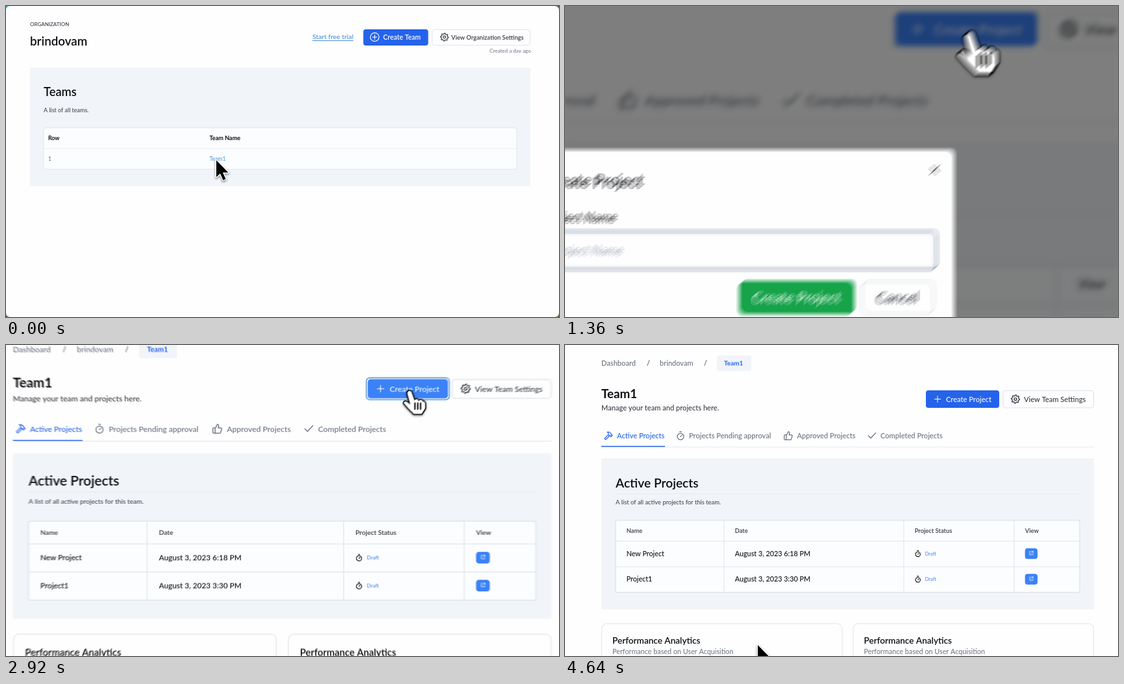
Recreate the animation shown at these times as an HTML page with a canvas. Size 852 by 480 pixels, loop 4.66 s.

```html
<!DOCTYPE html>
<html lang="en">
<head>
<meta charset="utf-8">
<title>Team dashboard walkthrough</title>
<style>
html, body { margin: 0; width: 100%; height: 100%; overflow: hidden; background: #fefefe; }
canvas { display: block; }
</style>
</head>
<body>
<canvas id="stage" width="852" height="480"></canvas>
<script>
const W = 852, H = 480, LOOP = 4660;
const OPEN_TEAM = 260, OPEN_MODAL = 850, SAVE = 2350;
const ORG = 'brindovam';

const newLayer = () => Object.assign(document.createElement('canvas'), { width: W, height: H }).getContext('2d');
const stage = document.getElementById('stage').getContext('2d');
const scene = newLayer(), backdrop = newLayer();
let g = scene;

const palette = {
  bg: '#fefefe', panel: '#f1f5f9', table: '#fcfdfe', hover: '#f5f7fa', line: '#e0e5ec', faint: '#e8ecf2',
  ink: '#0d0f13', text: '#363b44', mute: '#6a7280', hint: '#a3abb8',
  blue: '#2563eb', sky: '#3b82f6', link: '#4a8fd8', ring: '#94a3b8', onBlue: '#ffffff', green: '#16a34a'
};

const gear = (() => {
  const points = [];
  for (let i = 0; i < 32; i++) {
    const r = i % 4 < 2 ? 10 : 7.6, a = i / 16 * Math.PI;
    points.push(`${(12 + r * Math.cos(a)).toFixed(2)} ${(12 + r * Math.sin(a)).toFixed(2)}`);
  }
  return `M${points.join('L')}ZM15 12a3 3 0 1 1-6 0a3 3 0 1 1 6 0`;
})();

const icons = {
  gear,
  plus: 'M12 4v16M4 12h16',
  plusCircle: 'M22 12a10 10 0 1 1-20 0a10 10 0 1 1 20 0M12 7v10M7 12h10',
  timer: 'M10 2h4M12 14l3-3M20 14a8 8 0 1 1-16 0a8 8 0 1 1 16 0',
  thumb: 'M7 10v12M15 5.9 14 10h5.8a2 2 0 0 1 1.9 2.6l-2.3 8A2 2 0 0 1 17.5 22H4a2 2 0 0 1-2-2v-8a2 2 0 0 1 2-2h2.8a2 2 0 0 0 1.8-1.1L12 2a3.1 3.1 0 0 1 3 3.9Z',
  check: 'M21 5 9 18l-6-6',
  hammer: 'm15 12-8.5 8.5c-.8.8-2.2.8-3 0a2.1 2.1 0 0 1 0-3L12 9M17.6 15 22 10.6M20.9 11.7l-1.2-1.2c-.6-.6-1-1.4-1-2.3v-.9L16 4.6A5.6 5.6 0 0 0 12 3H9l1 .8A6.2 6.2 0 0 1 12 8.4V10l2 2h2.5l2.2 1.9',
  open: 'M9 5H5v14h14v-4M13 4h7v7M20 4l-9 9',
  close: 'M19 5 5 19M5 5l14 14'
};
for (const name in icons) icons[name] = new Path2D(icons[name]);

const arrow = new Path2D('M0 0V26L6 20.5L10.5 31L14.5 29L10 19H18.5Z');
const hand = new Path2D('M-2 4C-3-1 3-2 4 2L8 13C10 10 13 11 14 14C16 11 19 12 20 15C22 14 23 16 23 19V24L18 32H7L-1 24L-7 17C-7 13-3 14 2 19Z');
const fingers = new Path2D('M8.5 16v10M12.5 16v10M16.5 16v10');

// y is the middle of the capitals
function text(str, x, y, size, color = 'ink', weight = 400) {
  g.font = `${weight} ${size}px Lato, sans-serif`;
  g.fillStyle = palette[color];
  g.fillText(str, x, y + size * .35);
  return x + g.measureText(str).width;
}

function box(x0, y0, x1, y1, r, fill, stroke, width = 1) {
  g.beginPath();
  g.roundRect(x0, y0, x1 - x0, y1 - y0, r);
  if (fill) { g.fillStyle = palette[fill]; g.fill(); }
  if (stroke) { g.strokeStyle = palette[stroke]; g.lineWidth = width; g.stroke(); }
}

function line(x0, y0, x1, y1, color = 'line', width = 1) {
  g.beginPath();
  g.moveTo(x0, y0);
  g.lineTo(x1, y1);
  g.strokeStyle = palette[color];
  g.lineWidth = width;
  g.stroke();
}

function icon(name, cx, cy, size, color, weight = 2) {
  g.save();
  g.translate(cx - size / 2, cy - size / 2);
  g.scale(size / 24, size / 24);
  g.lineCap = g.lineJoin = 'round';
  g.lineWidth = weight;
  g.strokeStyle = palette[color];
  g.stroke(icons[name]);
  g.restore();
}

const clamp = v => Math.min(1, Math.max(0, v));
const ramp = (t, from, length) => clamp((t - from) / length);
const press = (t, at) => 1 - .16 * Math.sin(Math.PI * ramp(t, at, 200));

// Eased value between keys of the form [time, ...values]
function track(keys, t) {
  const i = keys.findIndex(k => k[0] > t);
  if (i < 1) return (i ? keys[keys.length - 1] : keys[0]).slice(1);
  const a = keys[i - 1], b = keys[i], u = (t - a[0]) / (b[0] - a[0]), e = u * u * (3 - 2 * u);
  return a.slice(1).map((v, j) => v + (b[j + 1] - v) * e);
}

const centerKeys = [[250, 426, 240], [850, 590, 126], [1035, 590, 126], [1715, 427, 260], [2430, 427, 260],
  [2960, 436, 241], [3230, 436, 241], [3840, 312, 284], [4120, 312, 284], [4640, 426, 240]];
const zoomKeys = [[250, 1], [850, 1.7], [1030, 1.7], [1300, 1.94], [1700, 1.925], [2430, 1.925],
  [2960, 1.08], [3230, 1.08], [3840, 1.516], [4120, 1.516], [4640, 1]];
const cursorKeys = [[200, 324, 238], [800, 614, 87], [3050, 614, 87], [3850, 412, 325], [4080, 412, 325], [4640, 297, 463]];
const camera = t => [...track(centerKeys, t), ...track(zoomKeys, t)];

function organizationPage() {
  const corners = g.createLinearGradient(0, 0, W, H);
  corners.addColorStop(0, '#5a9ca8');
  corners.addColorStop(.4, '#45454c');
  corners.addColorStop(1, '#6e5c3c');
  g.fillStyle = corners;
  g.fillRect(0, 0, W, H);
  box(0, 0, W, H, 6, 'bg');
  text('ORGANIZATION', 37, 28, 8, 'text', 500);
  text(ORG, 37, 54, 18.8, 'ink', 600);
  text('Start free trial', 472, 47.5, 10.4, 'link', 500);
  line(472, 53.5, 535, 53.5, 'link');
  box(550.5, 36, 650.5, 61, 4, 'blue');
  icon('plusCircle', 568, 48, 16, 'onBlue', 1.7);
  text('Create Team', 581, 48.5, 10.5, 'onBlue', 600);
  box(656.5, 36.5, 807.5, 60.5, 4, 'bg', 'line');
  icon('gear', 675.5, 48, 14.5, 'text');
  text('View Organization Settings', 686, 48.5, 9.3, 'text', 600);
  text('Created a day ago', 745, 69, 8.1, 'mute');
  box(37, 95, 808, 278, 0, 'panel');
  text('Teams', 58, 132.5, 18.3, 'ink', 600);
  text('A list of all teams.', 58, 160.5, 9, 'text');
  box(58, 188, 787, 252, 4, 'table', 'line');
  line(58, 220, 787, 220, 'faint');
  text('Row', 65, 203.5, 8.8, 'ink', 700);
  text('Team Name', 313.5, 203.5, 9.1, 'ink', 700);
  text('1', 65, 236, 8.6, 'mute');
  text('Team1', 313.5, 236, 8.6, 'link');
}

function teamHeader(hovered, focused) {
  text('Dashboard', 56, 28, 11.1, 'mute', 500);
  text('/', 126, 28, 11, 'text');
  text(ORG, 146, 28, 11, 'mute', 500);
  text('/', 214, 28, 11, 'text');
  box(234, 16, 287, 40, 3, 'panel');
  text('Team1', 245, 28, 10, 'blue', 700);
  text('Team1', 56, 75, 18.8, 'ink', 700);
  text('Manage your team and projects here.', 56, 97.5, 11.1, 'text', 500);

  if (focused) box(554, 68, 671, 99, 5, null, 'link', 1.3);
  box(556, 70, 669, 97, 4, hovered ? 'sky' : 'blue');
  icon('plus', 574, 83.5, 14, 'onBlue', 1.8);
  text('Create Project', 587, 84, 11.1, 'onBlue', 500);
  box(675, 70.5, 814.5, 97, 4, 'bg', 'line', 1.2);
  icon('gear', 694, 83.5, 15.5, 'text');
  text('View Team Settings', 707, 84, 11.1, 'text', 500);

  const tabs = [['hammer', 67, 'Active Projects', 80], ['timer', 178, 'Projects Pending approval', 191],
    ['thumb', 344, 'Approved Projects', 357.5], ['check', 473, 'Completed Projects', 486]];
  tabs.forEach(([name, ix, label, x], i) => {
    icon(name, ix, 140, 15, i ? 'mute' : 'blue');
    text(label, x, 140.5, 11.1, i ? 'mute' : 'blue', 500);
  });
  line(56, 157.5, 815, 157.5, 'line', .8);
  line(56, 156.5, 154, 156.5, 'blue', 1.4);
}

function teamPage(t, cx, cy) {
  const hovered = overButton(cx, cy);
  const rows = [['Project1', 'August 3, 2023 3:30 PM']];
  if (t > SAVE + 60) rows.unshift(['New Project', 'August 3, 2023 6:18 PM']);
  const full = rows.length > 1, bottom = 303 + rows.length * 39.5;
  const dividers = full ? [245, 522, 692] : [214, 508, 685];
  const columns = [78, ...dividers].map(x => x + 16.7);

  teamHeader(hovered, hovered && t > SAVE);
  box(56, 175, 815, bottom + 26, 0, 'panel');
  text('Active Projects', 78, 213.5, 19.2, 'ink', 600);
  line(78, 229.7, 793, 229.7, 'faint');
  text('A list of all active projects for this team.', 78, 242.5, 9.4, 'text');
  box(78, 270.5, 793, bottom, 3, 'table', 'line', 1.3);
  ['Name', 'Date', 'Project Status', 'View'].forEach((s, i) => text(s, columns[i], 286.7, 9.4, 'text', 600));

  rows.forEach(([name, date], i) => {
    const top = 302.7 + i * 39.5, y = top + 19.3, view = columns[3];
    if (cy > top && cy < top + 39.5 && cx < 793) box(78.7, top, 792.3, top + 39.5, 0, 'hover');
    line(78, top, 793, top);
    text(name, columns[0], y, 10.7, 'ink', 500);
    text(date, columns[1], y, 10.8, 'ink', 500);
    icon('timer', columns[2] + 5, y, 11, 'ink', 2.4);
    text('Draft', columns[2] + 16, y, 7.5, 'sky');
    box(view, y - 8.2, view + 19.3, y + 8.2, 4, 'sky');
    icon('open', view + 9.7, y - .8, 8.5, 'onBlue');
  });
  dividers.forEach(x => line(x, 270.5, x, bottom));

  for (const x of [56.5, 444]) {
    box(x, bottom + 48, x + 370.5, bottom + 200, 8, 'bg', 'line');
    text('Performance Analytics', x + 16.5, bottom + 74, 13.6, 'ink', 600);
    text('Performance based on User Acquisition', x + 16.5, bottom + 91.5, 10.8, 'mute');
  }
}

function modal(t, shown) {
  const grow = .93 + .07 * (t < SAVE ? ramp(t, 895, 120) : shown);
  g.save();
  g.globalAlpha = shown;
  g.translate(205.7, 135.3);
  g.scale(1 / 1.925, 1 / 1.925);
  g.translate(436, 226.5);
  g.scale(grow, grow);
  g.translate(-436, -226.5);
  box(107, 85, 765, 368, 9, 'bg');
  icon('close', 735, 116, 18, 'text', 2);
  text('Create Project', 138, 134, 23.8, 'ink', 600);
  text('Project Name', 138, 189.5, 18.4, 'ink', 500);
  box(135, 210, 738, 268.5, 8, 'bg', 'ring', 2.4);
  box(139, 213.5, 734, 265, 5, 'bg', 'line', 1.4);
  const typed = 'New Project'.slice(0, Math.floor(ramp(t, 1480, 500) * 11));
  const caret = typed ? text(typed, 150, 240, 18.1, 'text') : 150;
  if (!typed) text('Project Name', 150, 240, 18.1, 'hint');
  if (t > 1400) line(caret + .7, 228, caret + .7, 250, 'ink', 1.4);
  box(436, 286, 612, 337, 9, 'green');
  text('Create Project', 456.5, 312, 21.4, 'onBlue', 500);
  box(624, 287, 733.5, 336, 9, 'bg', 'line', 2);
  text('Cancel', 646, 312, 21.6, 'text', 500);
  g.restore();
}

const overButton = (x, y) => x > 556 && x < 669 && y > 70 && y < 97;

function cursor(t, x, y) {
  const pointing = t > OPEN_TEAM && overButton(x, y), scale = press(t, 60) * press(t, 860);
  g.save();
  g.translate(x, y);
  g.scale(scale, scale);
  g.lineJoin = 'round';
  g.shadowColor = 'rgba(0,0,0,.5)';
  g.shadowBlur = 3;
  g.shadowOffsetY = 1.5;
  g.lineWidth = 3;
  g.strokeStyle = pointing ? '#000' : '#fff';
  g.stroke(pointing ? hand : arrow);
  g.shadowColor = 'transparent';
  g.fillStyle = pointing ? '#fff' : '#000';
  g.fill(pointing ? hand : arrow);
  g.lineWidth = 1.8;
  if (pointing) g.stroke(fingers);
  g.restore();
}

function aim(layer, [x, y, zoom]) {
  g = layer;
  g.setTransform(1, 0, 0, 1, 0, 0);
  g.fillStyle = palette.bg;
  g.fillRect(0, 0, W, H);
  g.setTransform(zoom, 0, 0, zoom, W / 2 - x * zoom, H / 2 - y * zoom);
}

// The page behind the modal is blurred and darkened
function coverPage(shown, zoom) {
  g = scene;
  g.save();
  g.resetTransform();
  g.filter = `blur(${1.9 * zoom * shown}px)`;
  g.drawImage(backdrop.canvas, 0, 0);
  g.filter = 'none';
  g.fillStyle = `rgba(0,0,0,${.5 * shown})`;
  g.fillRect(0, 0, W, H);
  g.restore();
}

function drawScene(t) {
  const view = camera(t), [cx, cy] = track(cursorKeys, t);
  const shown = ramp(t, OPEN_MODAL, 100) - ramp(t, SAVE, 100);
  aim(scene, view);
  if (shown) aim(backdrop, view);
  if (t < OPEN_TEAM) organizationPage(); else teamPage(t, cx, cy);
  if (shown) {
    coverPage(shown, view[2]);
    modal(t, shown);
  }
  cursor(t, cx, cy);
}

// Several moments are averaged while the camera moves
function frame(now) {
  const t = now % LOOP, shutter = 15;
  const moving = camera(t - 5).some((v, i) => Math.abs(v - camera(t + 5)[i]) > .002);
  const samples = moving && t > 10 ? 6 : 1;
  for (let i = 0; i < samples; i++) {
    drawScene(t + shutter * ((i + .5) / samples - .5));
    stage.globalAlpha = 1 / (i + 1);
    stage.drawImage(scene.canvas, 0, 0);
  }
  requestAnimationFrame(frame);
}
requestAnimationFrame(frame);
</script>
</body>
</html>
```
